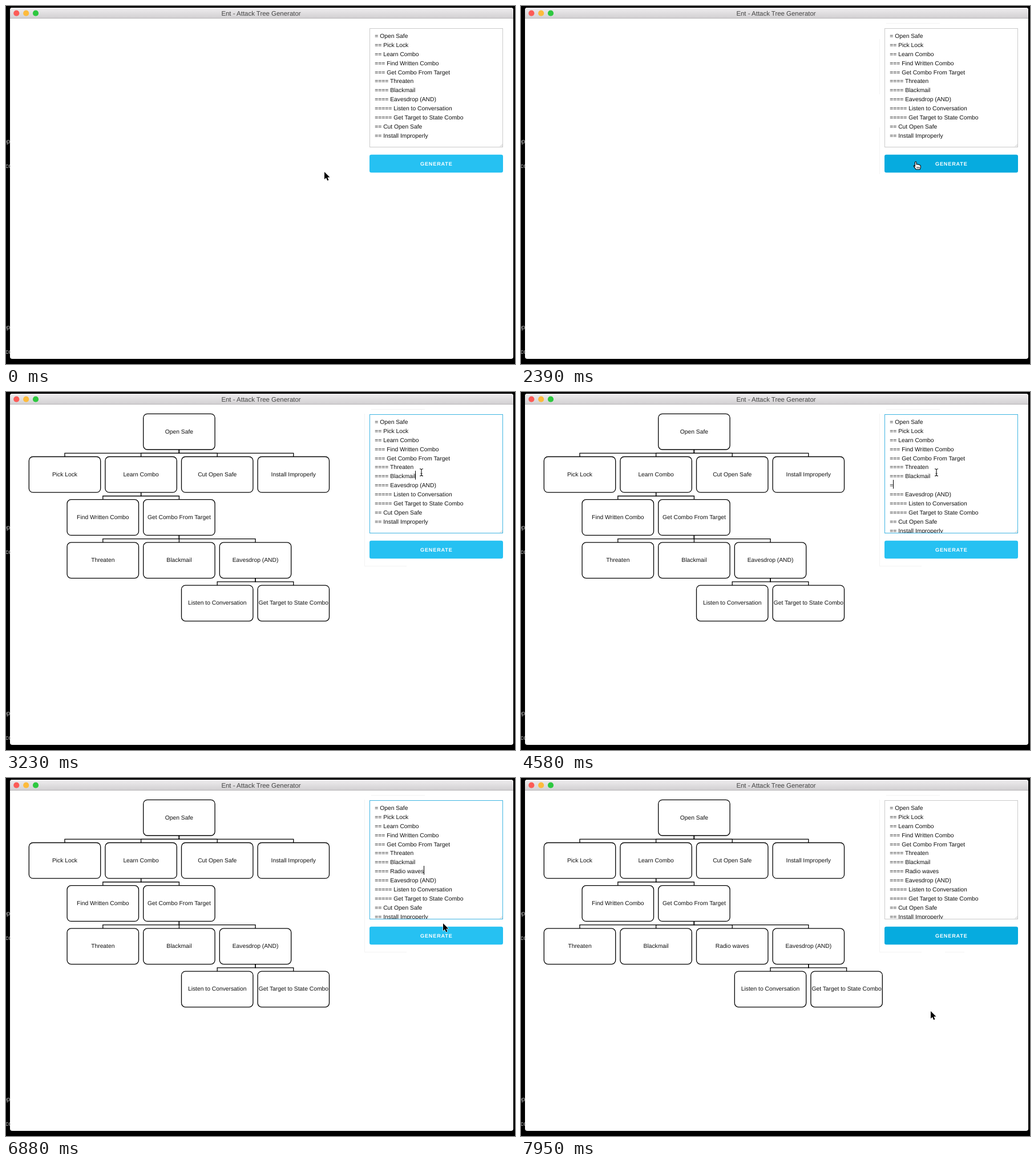
An HTML page for the animation above (8 s loop, 892 by 628 pixels).

```html
<!DOCTYPE html>
<html lang="en">
<head>
<meta charset="utf-8">
<title>Attack Tree Generator</title>
<style>
html, body { margin: 0; width: 100%; height: 100%; overflow: hidden; background: #000; }
svg { display: block; width: 892px; height: 628px; }
text { font: 10.3px "Liberation Sans", Arial, sans-serif; white-space: pre; fill: #111; text-rendering: geometricPrecision; }
.mid { text-anchor: middle; }
#title { font-size: 11.45px; fill: #444; }
#label { font-size: 9.1px; font-weight: bold; letter-spacing: .83px; fill: #fff; }
#behind text { font-size: 11px; fill: #bbb; }
#trees { fill: none; stroke: #000; stroke-width: 1.3; }
#trees text { fill: #111; stroke: none; }
#faint path { fill: none; stroke: #f3f3f3; }
</style>
</head>
<body>
<svg viewBox="0 0 892 628">
  <defs>
    <linearGradient id="bar" x2="0" y2="1">
      <stop stop-color="#efedef"/><stop offset="1" stop-color="#d1cfd1"/>
    </linearGradient>
    <clipPath id="inner"><rect x="638" y="40" width="233" height="207"/></clipPath>
  </defs>
  <g id="behind">
    <text x="-5" y="241">pp</text><text x="-1" y="284">co</text>
    <text x="-5" y="567">pp</text><text x="-1" y="610">co</text>
  </g>
  <rect x="7" y="3" width="882" height="616" rx="4" fill="#fff"/>
  <path d="M7 22V7q0-4 4-4H885q4 0 4 4V22Z" fill="url(#bar)"/>
  <path d="M7 21.5H889" stroke="#b5b3b5"/>
  <circle cx="18.3" cy="12.7" r="5.1" fill="#fc5b57"/>
  <circle cx="35.2" cy="12.7" r="5.1" fill="#fdbb3c"/>
  <circle cx="52" cy="12.7" r="5.1" fill="#2ec840"/>
  <text id="title" class="mid" x="447" y="17">Ent - Attack Tree Generator</text>

  <g id="faint">
    <path data-at="780" d="M628.5 58V155M628.5 213V295"/>
    <path data-at="1230" d="M640 30.5H734"/>
    <path data-at="2480" d="M628.5 38V305.5H702"/>
    <path data-at="7860" d="M743 305.5H777"/>
  </g>
  <g id="trees"></g>

  <rect id="area" x="637.5" y="39.5" width="233" height="208" fill="#fff"/>
  <path d="M866 246.5l4-4M868.5 246.5l1.5-1.5" stroke="#aaa" stroke-width=".7"/>
  <g id="lines" clip-path="url(#inner)"></g>
  <rect id="caret" width="1" height="15.5"/>
  <rect id="button" x="637" y="260.7" width="234" height="31.5" rx="3.3"/>
  <text id="label" class="mid" x="754.3" y="280.4">GENERATE</text>

  <g id="cursor" stroke-linejoin="round">
    <path id="arrow" d="M0 0V13L3 10.3L5.2 15.3L7.5 14.3L5.3 9.5H9.5Z" stroke="#fff" stroke-width="1.2" paint-order="stroke"/>
    <path id="beam" d="M-3 -6.2Q0 -6.2 0 -4.2Q0 -6.2 3 -6.2M0 -4.5V4.5M-3 6.2Q0 6.2 0 4.2Q0 6.2 3 6.2M-1.5 2H1.5" fill="none" stroke="#111" stroke-width="1.1"/>
    <g id="hand" stroke="#000" stroke-width="1.1">
      <path d="M-3.6 1.5V-5.4Q-3.5 -7 -2.3 -7Q-1.1 -7 -1 -5.4V-2Q.6 -3.2 1.8 -1.7Q3.2 -2.6 4.2 -1Q6.3 -1.4 6.3 1V3Q6.2 4.6 5 6.8H-1.8Q-3.2 4.5 -5.7 1.3Q-6.4 -.6 -4.8 -.1Z" fill="#fff"/>
      <path d="M0 2V5M2 2V5M4 2V5" stroke-width=".8"/>
    </g>
  </g>
</svg>
<script>
const $ = id => document.getElementById(id);
const LOOP = 8000, STEP = 89;

function add(parent, tag, attrs, text = '') {
  const el = document.createElementNS('http://www.w3.org/2000/svg', tag);
  for (const k in attrs) el.setAttribute(k, attrs[k]);
  el.textContent = text;
  return parent.appendChild(el);
}
const show = (el, on) => el.style.display = on ? '' : 'none';

const outline = `= Open Safe
== Pick Lock
== Learn Combo
=== Find Written Combo
=== Get Combo From Target
==== Threaten
==== Blackmail
==== Eavesdrop (AND)
===== Listen to Conversation
===== Get Target to State Combo
== Cut Open Safe
== Install Improperly`.split('\n');
const SPLIT = 7;
const withLine = line => [...outline.slice(0, SPLIT), line, ...outline.slice(SPLIT)];

// Nest the outline by its number of equal signs
function parse(lines) {
  const path = [];
  for (const line of lines) {
    const depth = line.indexOf(' ') - 1;
    const node = { name: line.slice(depth + 2), kids: [] };
    if (depth) path[depth - 1].kids.push(node);
    path[depth] = node;
  }
  return path[0];
}

// Columns are half a box pitch apart; children are centred under their parent
function drawNode(g, node, col, depth) {
  const x = 103 + 66.8 * col, y = 38.3 + 75.2 * depth;
  add(g, 'rect', { x: x - 62.7, y, width: 125.4, height: 62.7, rx: 7 });
  add(g, 'text', { x, y: y + 34.2, class: 'mid' }, node.name);
  node.kids.forEach((kid, i) => {
    const c = col + 2 * i - node.kids.length + 1;
    add(g, 'path', { d: `M${x} ${y + 62.7}v6.3H${103 + 66.8 * c}v6.2` });
    drawNode(g, kid, c, depth + 1);
  });
}
const trees = [outline, withLine('==== Radio waves')].map(lines => {
  const g = add($('trees'), 'g', {});
  drawNode(g, parse(lines), 3, 0);
  return g;
});

const rows = Array.from({ length: 13 }, (_, i) =>
  add($('lines'), 'text', { x: 646.3, y: 56 + 15.88 * i }));

// [time, text of the new line]
const typing = [[4040, 0], [4580, 1], [4760, 2], [4940, 3], [5110, 4], [5290, 5], [5730, 6],
  [5910, 7], [6000, 8], [6080, 10], [6170, 11], [6250, 12], [6340, 13], [6520, 14], [6610, 15], [6700, 16]];

// [start, then one position per step]
const moves = [
  [0, '558,291'],
  [270, '579,282'],
  [420, '610,265 650,235 700,190 745,150 775,115 789,95 780,80 755,70 730,66'],
  [1230, '716,35 712,18 717,90 721,153 719,180 714,205 707,226 700,245 693,258 690,268'],
  [2120, '694,280'],
  [2570, '704,205 715,124'],
  [2870, '719,128 724,135 728,141'],
  [6520, '735,160 745,185 755,212 763,238 766,255'],
  [7150, '769,269'],
  [7860, '745,345 718,409']
].map(([t, s]) => [t, s.split(' ').map(p => p.split(',').map(Number))]);

const latest = (list, t) => list.findLast(e => e[0] <= t);

function drawCursor(t, hover) {
  const [start, pts] = latest(moves, t);
  const [x, y] = pts[Math.min(pts.length - 1, Math.floor((t - start) / STEP))];
  const inside = (top, bottom) => x > 637 && x < 871 && y > top && y < bottom;
  const kind = inside(40, 248) ? 'beam' : hover && inside(260, 293) ? 'hand' : 'arrow';
  for (const id of ['arrow', 'beam', 'hand']) show($(id), id === kind);
  $('cursor').setAttribute('transform', `translate(${x} ${y})`);
}

function draw(t) {
  const focus = t >= 3230 && t < 7240;
  const hover = t >= 2120 && t < 3230 || t >= 7150;
  const typed = latest(typing, t);
  const lines = typed ? withLine('==== Radio waves'.slice(0, typed[1])) : outline;
  rows.forEach((row, i) => row.textContent = lines[i] || '');

  const at = typed ? SPLIT : SPLIT - 1;
  const width = lines[at] ? rows[at].getComputedTextLength() : 0;
  $('caret').setAttribute('x', Math.floor(646.3 + width));
  $('caret').setAttribute('y', 138.2 + (typed ? 15.9 : 0));
  show($('caret'), focus && (t < 3680 || t >= 4040));

  $('area').setAttribute('stroke', focus ? '#3fb5e2' : '#cacaca');
  $('button').setAttribute('fill', hover ? '#06abdf' : '#26c1f2');
  show(trees[0], t >= 2480 && t < 7410);
  show(trees[1], t >= 7410);
  for (const p of $('faint').children) show(p, t >= p.dataset.at);
  drawCursor(t, hover);
}

function frame() {
  draw(performance.now() % LOOP);
  requestAnimationFrame(frame);
}
frame();
</script>
</body>
</html>
```
